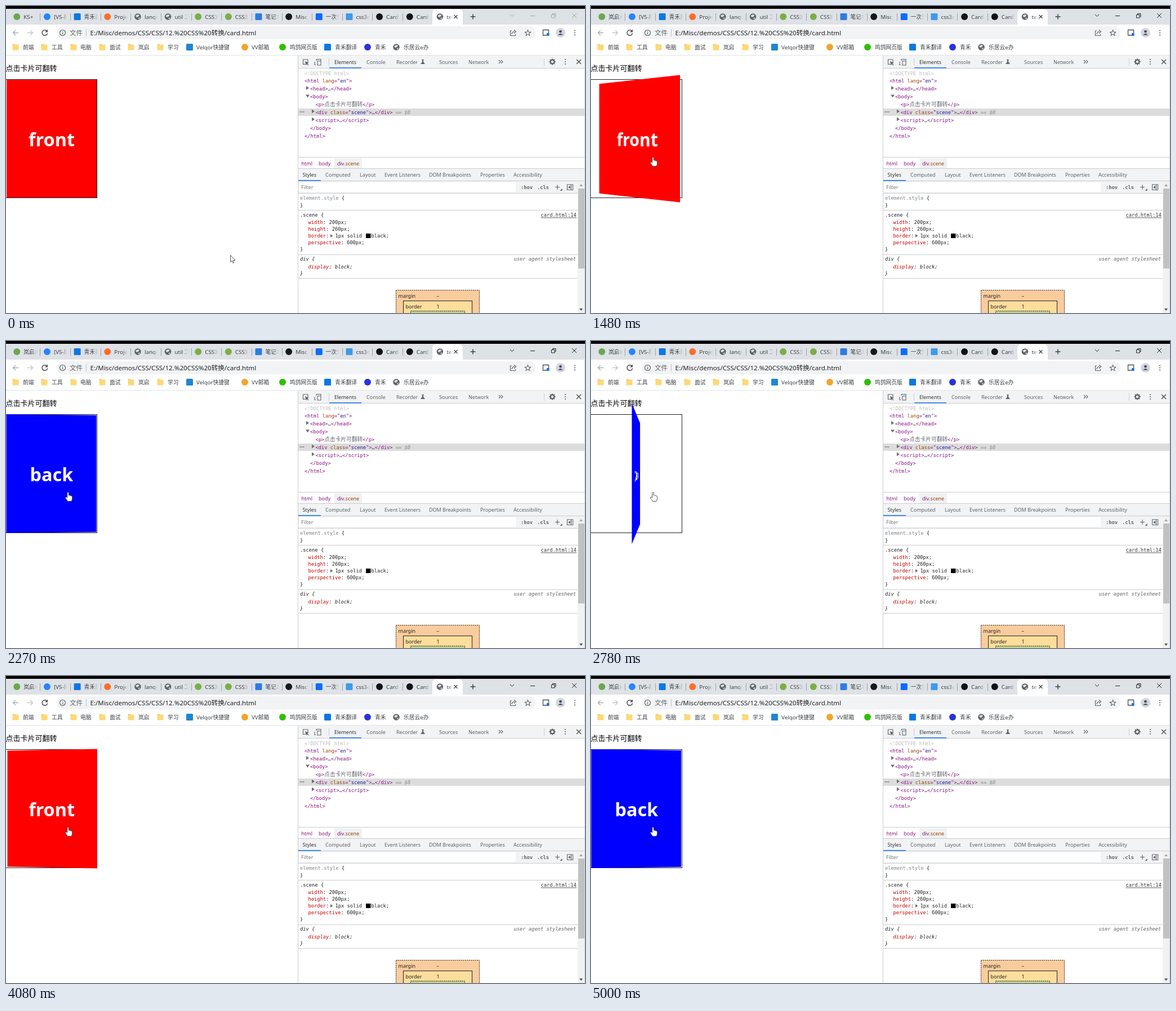
An HTML page with a canvas for the animation above (5.04 s loop, 1028x545 px).

```html
<!DOCTYPE html>
<html lang="zh">
<head>
<meta charset="utf-8">
<title>Card flip</title>
<style>
  html, body { margin: 0; width: 100%; height: 100%; overflow: hidden; background: #fff; }
  body { position: relative; }
  canvas { position: absolute; left: 0; top: 0; }
  #scene {
    position: absolute; left: 1px; top: 131px; width: 160px; height: 209px;
    perspective: 486px;
  }
  .face {
    position: absolute; inset: 0; backface-visibility: hidden; will-change: transform;
    display: flex; align-items: center; justify-content: center;
    color: #fff; font: bold 32.4px "Noto Sans", "Open Sans", sans-serif;
  }
  #front { background: #f00; }
  #back { background: #00f; }
</style>
</head>
<body>
<canvas id="page" width="1028" height="545"></canvas>
<div id="scene">
  <div class="face" id="front">front</div>
  <div class="face" id="back">back</div>
</div>
<canvas id="pointer" width="1028" height="545"></canvas>
<script>
const LOOP = 5040;
const CJK = '"Noto Sans CJK SC", "Noto Sans CJK JP", "Noto Sans CJK", sans-serif';
const SANS = '"Noto Sans", ' + CJK;
const MONO = '"DejaVu Sans Mono", ' + CJK;
const CODE = '8.75px ' + MONO;
const UI = '9px ' + SANS;
const c = document.getElementById('page').getContext('2d');
const p = document.getElementById('pointer').getContext('2d');
const front = document.getElementById('front');
const back = document.getElementById('back');

function box(x, y, w, h, color) {
  c.fillStyle = color;
  c.fillRect(x, y, w, h);
}
function round(x, y, w, h, r, color) {
  c.fillStyle = color;
  c.beginPath();
  c.roundRect(x, y, w, h, r);
  c.fill();
}
function disc(x, y, r, color) {
  c.fillStyle = color;
  c.beginPath();
  c.arc(x, y, r, 0, 7);
  c.fill();
}
function ring(x, y, r, color, w = 1.2) {
  c.strokeStyle = color;
  c.lineWidth = w;
  c.beginPath();
  c.arc(x, y, r, 0, 7);
  c.stroke();
}
function stroke(d, color = '#5f6368', w = 1.2, x = 0, y = 0) {
  c.save();
  c.translate(x, y);
  c.strokeStyle = color;
  c.lineWidth = w;
  c.stroke(new Path2D(d));
  c.restore();
}
function fill(d, color, x = 0, y = 0) {
  c.save();
  c.translate(x, y);
  c.fillStyle = color;
  c.fill(new Path2D(d));
  c.restore();
}
function text(s, x, y, font, color = '#3c4043') {
  c.font = font;
  c.fillStyle = color;
  c.fillText(s, x, y);
  return x + c.measureText(s).width;
}
// Segments: [string, colour, optional font]
function run(x, y, ...parts) {
  for (const [s, color, font] of parts) x = text(s, x, y, font || CODE, color);
}
function globe(x, y) {
  disc(x, y, 5.8, '#5f6368');
  fill('M-4 -2 L0 -4 L3 -3 L1 0 L-2 1 Z M0 3 L4 1 L3 4 Z', '#dee1e6', x, y);
}
function dots(x, y, color) {
  for (const d of [-4, 0, 4]) disc(x, y + d, 1.1, color);
}
function icon(kind, x, y) {
  if (kind === 'globe') globe(x, y);
  else if (kind[0] === 'o') disc(x, y, 6, kind.slice(1));
  else round(x - 6, y - 6, 12, 12, 1.5, kind);
}

function tabs(first, active) {
  box(0, 5, 1028, 28, '#dee1e6');
  round(757, 6, 54, 30, [6, 6, 0, 0], '#fff');
  const list = [
    ['o#69a84f', first], ['o#2684ff', '[V5-版'], ['#0b78e3', '青禾翻'], ['o#fc6d26', 'Project'],
    ['globe', 'lanqiu'], ['globe', 'util 工'], ['o#78b043', 'CSS3'], ['o#78b043', 'CSS3'],
    ['#2a7de1', '笔记本'], ['o#181717', 'Misc'], ['#0a6cff', '一次性'], ['#3d9be9', 'css3d'],
    ['o#111', 'Card'], ['o#111', 'Card'], ['globe', 'tes']
  ];
  list.forEach(([kind, label], i) => {
    const x = 19.3 + i * 53.65, last = i === 14, w = last ? 12 : 24;
    icon(kind, x, 19);
    c.save();
    c.beginPath();
    c.rect(x + 11, 8, w, 22);
    c.clip();
    text(label, x + 12, 23, '9.8px ' + SANS);
    const rgb = last ? '255,255,255' : '222,225,230';
    const fade = c.createLinearGradient(x + 3 + w, 0, x + 11 + w, 0);
    fade.addColorStop(0, `rgba(${rgb},0)`);
    fade.addColorStop(1, `rgb(${rgb})`);
    box(x + 3 + w, 8, 9, 22, fade);
    c.restore();
    if (i < 13) box(Math.round(x + 41), 13, 1, 13, '#9da1a8');
  });
  stroke('M-3 -3 L3 3 M3 -3 L-3 3', '#3c4043', 1.2, 798.5, 19);
  stroke('M-4.5 0 H4.5 M0 -4.5 V4.5', '#3c4043', 1.5, 829, 19);
  const ink = active ? '#202124' : '#a3a6ab';
  stroke('M895 15 L898.5 18.5 L902 15 M931 17.5 H939 M968.5 15.5 H974 V21 H968.5 Z'
    + ' M970.5 15 V13.5 H976 V19 H974.5 M1005 13 L1013 21 M1013 13 L1005 21', ink, 1);
}

function toolbar() {
  box(0, 33, 1028, 55, '#fff');
  stroke('M22 47.5 H12.5 M17 43 L12.5 47.5 L17 52', '#a9acb0', 1.3);
  stroke('M38 47.5 H47.5 M43 43 L47.5 47.5 L43 52', '#c3c5c8', 1.3);
  stroke('M73 45 A4.8 4.8 0 1 0 73.6 48.5', '#4a4d51', 1.5);
  fill('M74 41.5 V46.5 H69 Z', '#4a4d51');
  round(90, 36, 850, 23, 11.5, '#f1f3f4');
  ring(100.5, 47.5, 5, '#5f6368');
  box(100, 46.5, 1.2, 4, '#5f6368');
  box(100, 44.3, 1.2, 1.2, '#5f6368');
  text('文件', 113, 51.5, '11.5px ' + SANS, '#5f6368');
  box(142, 41, 1, 13, '#bdc1c6');
  text('E:/Misc/demos/CSS/CSS/12.%20CSS%20转换/card.html', 149.5, 51.5, '11.6px ' + SANS, '#202124');
  stroke('M898 44 H895.5 V52.5 H904.5 V50 M898 50 Q898.5 45.5 903 45.5 M902 42.5 L905.5 45.5 L902 48.5');
  let star = '';
  for (let i = 0; i < 10; i++) {
    const a = i * Math.PI / 5 - Math.PI / 2, r = i % 2 ? 2.4 : 5.4;
    star += (i ? 'L' : 'M') + (926.5 + r * Math.cos(a)) + ' ' + (48 + r * Math.sin(a));
  }
  stroke(star + 'Z', '#5f6368', 1.1);
  stroke('M953.5 42.5 H963.5 V52 H953.5 Z', '#4a4d51', 1.3);
  box(960, 48, 4.5, 5, '#1a73e8');
  disc(984.5, 47.5, 8.5, '#d3d7de');
  disc(984.5, 45.3, 2.3, '#3c4660');
  fill('M980 51.5 Q984.5 46.5 989 51.5 Z', '#3c4660');
  dots(1010, 47.5, '#5f6368');

  const marks = [
    ['dir', 17, 30, '前端'], ['dir', 68, 81, '工具'], ['dir', 120, 132, '电脑'],
    ['dir', 171, 184, '面试'], ['dir', 222, 235, '岚启'], ['dir', 274, 287, '学习'],
    ['#1f86d1', 326, 338, 'Velqor快捷键'], ['o#f2a52b', 424, 436, 'VV邮箱'],
    ['o#2dc100', 491, 504, '鸣鸽网页版'], ['#0b78e3', 571, 584, '青禾翻译'],
    ['o#2932e1', 642, 655, '青禾'], ['globe', 693, 706, '乐居云e办']
  ];
  for (const [kind, x, tx, label] of marks) {
    if (kind === 'dir') {
      round(x - 5.5, 67.5, 5, 3, 1, '#f2c94f');
      round(x - 5.5, 68.5, 11, 10, 1, '#fcd876');
    } else icon(kind, x, 73);
    text(label, tx, 77, '9.75px ' + SANS);
  }
  box(0, 87, 1028, 1, '#e1e3e6');
}

function elements() {
  const tag = '#881280', attr = '#994500', val = '#1a1aa6', grey = '#80868b';
  box(518, 88, 510, 457, '#fff');
  box(518, 88, 510, 22, '#f1f3f4');
  box(518, 110, 510, 1, '#cacdd1');
  stroke('M536 100 V95 H527.5 V103.5 H532', '#5f6368', 1.1);
  fill('M531 98 L538 101 L535 102 L537.5 104.5 L536.5 105.5 L534 103 L533 106 Z', '#5f6368');
  stroke('M550 104.5 H548 V99 M551 94.5 H559 V97 M551 97 V94.5 M553 97.5 H559 V105 H553 Z', '#5f6368', 1.1);
  box(573, 93, 1, 13, '#cacdd1');
  const heads = [['Elements', 583], ['Console', 640], ['Recorder', 693], ['Sources', 769], ['Network', 821]];
  heads.forEach(([s, x], i) => text(s, x, 102.5, UI, i ? '#5f6368' : '#333'));
  box(574, 109, 57, 1.5, '#1a73e8');
  fill('M738 95 H742 V96 H741 V99 L744 103 H736 L739 99 V96 H738 Z', '#5f6368');
  stroke('M875 96 L878 99 L875 102 M879 96 L882 99 L879 102', '#5f6368', 1.1);
  box(955, 93, 1, 13, '#cacdd1');
  ring(970, 99, 3.4, '#5f6368', 2.4);
  for (let i = 0; i < 8; i++) {
    const a = i * Math.PI / 4;
    disc(970 + 4.8 * Math.cos(a), 99 + 4.8 * Math.sin(a), 1, '#5f6368');
  }
  dots(993, 99, '#5f6368');
  stroke('M1013 95 L1021 103 M1021 95 L1013 103', '#4a4d51', 1.4);

  box(519, 182, 509, 13, '#dcdcdc');
  run(530, 122.5, ['<!DOCTYPE html>', '#bdbdbd']);
  run(530, 136, ['<html ', tag], ['lang', attr], ['="', tag], ['en', val], ['">', tag]);
  run(540, 150, ['<head>', tag], ['…', '#303942'], ['</head>', tag]);
  run(540, 164, ['<body>', tag]);
  run(549.5, 178, ['<p>', tag], ['点击卡片可翻转', '#62676d', '9.7px ' + CJK], ['</p>', tag]);
  run(549.5, 191.7, ['<div ', tag], ['class', attr], ['="', tag], ['scene', val], ['">', tag],
    ['…', '#303942'], ['</div>', tag], [' == ', grey], ['$0', grey, 'italic ' + CODE]);
  run(549.5, 205.7, ['<script>', tag], ['…', '#303942'], ['<\/script>', tag]);
  run(540, 219.5, ['</body>', tag]);
  run(530, 233.5, ['</html>', tag]);
  for (const [x, y] of [[533, 145.5], [543, 187], [543, 201]]) fill('M0 -3.5 L5 0 L0 3.5 Z', '#6e6e6e', x, y);
  fill('M532 157.5 H539 L535.5 162.5 Z', '#6e6e6e');
  for (const x of [522.5, 525.5, 528.5]) disc(x, 188, 0.9, '#5f6368');

  box(518, 268, 510, 1, '#cacdd1');
  box(583, 270, 49, 18, '#eff1f2');
  text('html', 524.5, 282.5, UI, tag);
  text('body', 555, 282.5, UI, tag);
  run(588, 282.5, ['div', tag, UI], ['.scene', attr, UI]);
}

function styles() {
  const prop = '#c80000', ink = '#202124', grey = '#80868b';
  box(518, 288, 510, 23, '#f1f3f4');
  box(518, 288, 510, 1, '#cacdd1');
  box(518, 310, 510, 1, '#cacdd1');
  const heads = [['Styles', 526.5], ['Computed', 567], ['Layout', 628], ['Event Listeners', 672],
    ['DOM Breakpoints', 751], ['Properties', 842], ['Accessibility', 901]];
  heads.forEach(([s, x], i) => text(s, x, 303, UI, i ? '#5f6368' : '#333'));
  box(519, 309, 40, 1.5, '#1a73e8');
  box(518, 311, 510, 21, '#f1f3f4');
  box(520, 313, 385, 17, '#fff');
  text('Filter', 524, 325, UI, '#757575');
  text(':hov', 914, 324.5, 'bold ' + CODE, '#5f6368');
  text('.cls', 943, 324.5, 'bold ' + CODE, '#5f6368');
  stroke('M975 321.5 H983 M979 317.5 V325.5', '#5f6368', 1.2);
  fill('M987.5 324 V328 H983.5 Z', '#5f6368');
  stroke('M996.5 317 H1006.5 V326.5 H996.5 Z M1003.5 317 V326', '#5f6368', 1.1);
  fill('M1002 319 V324.5 L998 321.8 Z', '#5f6368');
  for (const y of [332, 362, 441, 483]) box(518, y, 497, 1, '#cacdd1');

  run(522, 343.5, ['element.style ', grey], ['{', ink]);
  run(522, 357, ['}', ink]);
  run(522, 374, ['.scene {', ink]);
  run(536.5, 387, ['width', prop], [': 200px;', ink]);
  run(536.5, 399, ['height', prop], [': 260px;', ink]);
  run(536.5, 411, ['border', prop], [':', ink]);
  fill('M576 405 L580.5 408 L576 411 Z', '#6e6e6e');
  run(584.5, 411, ['1px solid', ink]);
  box(639, 404, 8.5, 8, '#000');
  run(648.5, 411, ['black;', ink]);
  run(536.5, 422.5, ['perspective', prop], [': 600px;', ink]);
  run(522, 434.5, ['}', ink]);
  run(949.5, 374, ['card.html:14', '#333']);
  box(949.5, 375.5, 63.5, 0.8, '#333');
  const it = 'italic ' + CODE;
  run(522, 452, ['div {', ink, it]);
  run(536.5, 465.5, ['display', prop, it], [': block;', ink, it]);
  run(522, 477.5, ['}', ink, it]);
  run(901.5, 452, ['user agent stylesheet', '#5f6368', it]);

  const frame = (x, y, w, color, dash) => {
    box(x, y, w, 60, color);
    c.save();
    c.setLineDash(dash);
    c.lineWidth = 1;
    c.strokeStyle = '#222';
    c.strokeRect(x + 0.5, y + 0.5, w - 1, 60);
    c.restore();
  };
  frame(692, 504, 149, '#f9cc9d', [2, 1.5]);
  frame(705, 523, 123, '#fddd9b', []);
  frame(718, 541, 97, '#c3d08b', [2, 1.5]);
  text('margin', 696.5, 517.5, UI, '#222');
  text('–', 764.5, 517.5, UI, '#222');
  text('border', 709.5, 536.5, UI, '#222');
  text('1', 764.5, 536.5, UI, '#222');

  box(1015, 311, 13, 234, '#f1f1f1');
  box(1016, 324, 11, 142, '#c1c1c1');
  fill('M1018 320 L1021 316 L1024 320 Z', '#a3a3a3');
  fill('M1018 537 L1021 541 L1024 537 Z', '#505050');
  box(518, 88, 1, 457, '#cacdd1');
  box(1027, 33, 1, 512, '#d5d7da');
}

function page(first, active) {
  box(0, 0, 1028, 545, '#fff');
  box(0, 0, 1028, 5, '#000');
  tabs(first, active);
  toolbar();
  text('点击卡片可翻转', -0.5, 115, '13px ' + CJK, '#000');
  c.strokeStyle = '#222';
  c.lineWidth = 1;
  c.strokeRect(-0.5, 130.5, 162, 210);
  elements();
  styles();
}

// The CSS "ease" curve, cubic-bezier(.25, .1, .25, 1)
function ease(x) {
  if (x <= 0) return 0;
  if (x >= 1) return 1;
  let lo = 0, hi = 1, s;
  for (let i = 0; i < 25; i++) {
    s = (lo + hi) / 2;
    if (0.75 * s * (1 - s) + s ** 3 < x) lo = s; else hi = s;
  }
  return 0.3 * s * (1 - s) ** 2 + 3 * s * s * (1 - s) + s ** 3;
}
function angle(t) {
  const turn = (start, length) => ease((t - start) / length);
  return -180 * (turn(1336, 1100) - turn(2482, 1070) + turn(4028, 1180));
}

const ARROW = new Path2D('M0.5 0.5 V12.6 L3.2 10.1 L5.1 14.4 L7 13.6 L5.2 9.4 H9 Z');
const HAND = new Path2D('M-1.2 10 V1.2 Q0 -0.6 1.3 1.2 V6 Q2.8 5 3.8 6.6 Q5.2 5.8 6 7.3 Q7.4 6.8 7.6 8.6'
  + ' V12 Q7.4 14 6 16.6 H-0.6 Q-2 13.6 -4.4 10.9 Q-4.8 8.8 -2.8 9 Z');
function pointer(t) {
  const u = Math.min(1, Math.max(0, (t - 200) / 1000));
  const k = 1 - (1 - u) ** 1.455;
  const x = 398 - 288 * k, y = 442 - 174 * k;
  const shape = x < 162 ? HAND : ARROW;
  p.clearRect(0, 0, 1028, 545);
  p.save();
  p.translate(x, y);
  p.fillStyle = '#fff';
  p.strokeStyle = '#444';
  p.lineWidth = 0.9;
  p.fill(shape);
  p.stroke(shape);
  p.restore();
}

let shown = '';
function draw(t) {
  const first = t % 1030 < 50 ? 'K5+' : '岚启K';
  const active = t >= 1340;
  if (shown !== first + active) {
    shown = first + active;
    page(first, active);
  }
  const a = angle(t);
  front.style.transform = `rotateY(${a}deg)`;
  back.style.transform = `rotateY(${a + 180}deg)`;
  pointer(t);
}
const began = performance.now();
function tick() {
  draw((performance.now() - began) % LOOP);
  requestAnimationFrame(tick);
}
tick();
</script>
</body>
</html>
```
